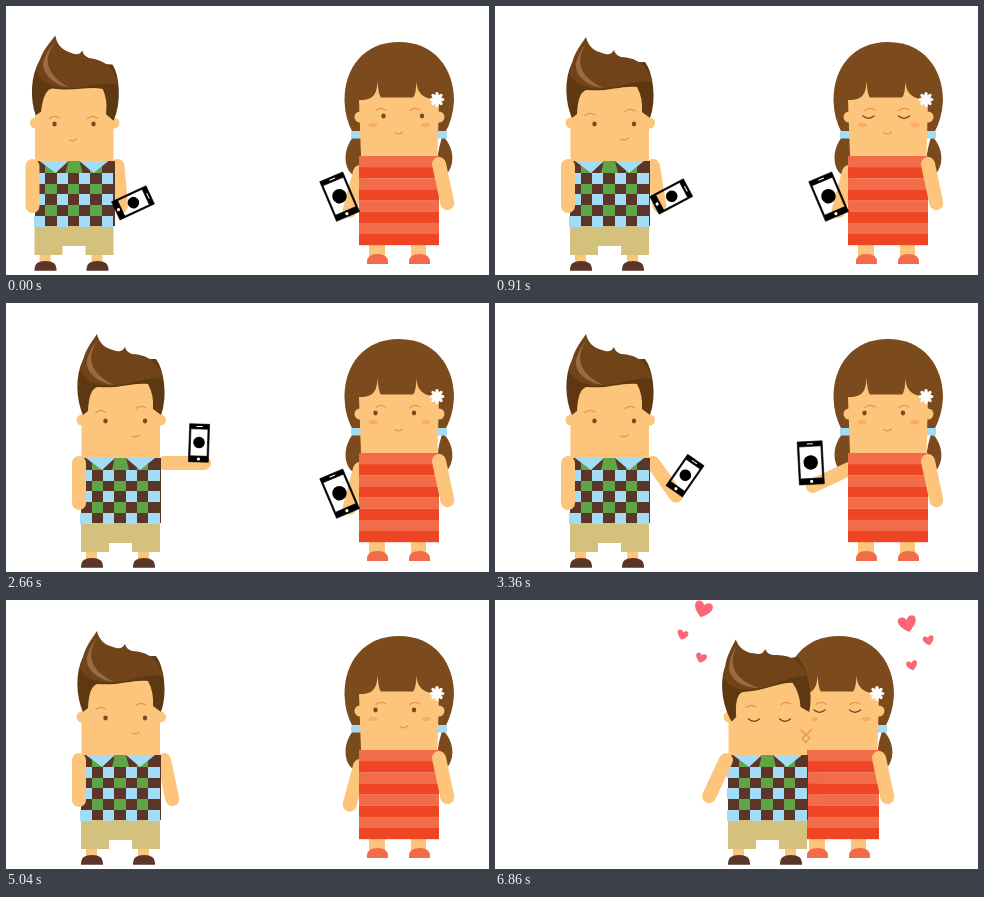
Animation of 483x269 px, one loop 7 s. Source, as an HTML page:

```html
<!DOCTYPE html>
<html lang="en">
<head>
<meta charset="utf-8">
<title>Two friends</title>
<style>
html, body { margin: 0; width: 100%; height: 100%; overflow: hidden; background: #fff; }
svg { display: block; width: 483px; height: 269px; }
.skin { fill: #fdc57b; }
.line { fill: none; stroke-linecap: round; stroke-width: 1.3; }
.brow { stroke: #e8974a; }
.lash { stroke: #71431f; }
.eye { fill: #7a4a20; }
.hairSide { fill: #5e3810; }
.hairTop { fill: #704318; }
.girlHair { fill: #7b4b1d; }
.shoe { fill: #5b3528; }
.sandal { fill: #f26c4a; }
.blue { fill: #a3dcf5; }
.green { fill: #5fa548; }
.heart { fill: #fd6674; }
</style>
</head>
<body>
<svg viewBox="0 0 483 269" id="stage"></svg>
<script>
const LOOP = 7000, STEP = 70;
const stage = document.getElementById('stage');
const $ = id => document.getElementById(id);

const rect = (x, y, w, h, extra = '') => `<rect x="${x}" y="${y}" width="${w}" height="${h}" ${extra}/>`;
const arm = id => `<g id="${id}">${rect(-7, -7, 14, 54, 'rx="7" class="skin"')}</g>`;
const line = (d, cls) => `<path class="line ${cls}" d="${d}"/>`;
const eye = (x, y) => `<ellipse class="eye" cx="${x}" cy="${y}" rx="2.2" ry="2.4"/>`;
const lash = (x, y) => line(`M${x - 5.5} ${y - 1}q5.5 4.6 11 0`, 'lash');
const brow = (x, y) => line(`M${x - 5} ${y + 1.5}q4.5 -4 10 -.5`, 'brow');
const ear = (x, y) => `<circle class="skin" cx="${x}" cy="${y}" r="5.5"/>`;
const shoe = (x, y, w, h, cls) =>
  `<path class="${cls}" d="M${x} ${y + h}v-2q0 ${2 - h} ${w / 2} ${2 - h}t${w / 2} ${h - 2}v2z"/>`;

// The frame is hollow, so the hand shows through the screen.
const phone = (id, w, h) => `<g id="${id}">
  <path fill-rule="evenodd" d="M${-w / 2} ${-h / 2}h${w}v${h}h${-w}zM${1.5 - w / 2} ${5 - h / 2}v${h - 11}h${w - 3}v${11 - h}z"
    stroke="#000" stroke-linejoin="round" stroke-width=".6"/>
  ${rect(-3, -h / 2 + 2, 6, 1, 'fill="#fff"')}
  <circle cy="${h / 2 - 3}" r="1.6" fill="#fff"/>
  <circle cy="-.5" r="${w * .29}"/></g>`;

function shirt() {
  const cell = 11.3, rowH = 10.75;
  let out = rect(75, 155, 80, 65, 'class="shoe"');
  for (let r = 0; r < 6; r++)
    for (let c = 0; c < 7; c++)
      if ((r + c) % 2) out += rect((74.4 + c * cell).toFixed(1), (156 + r * rowH).toFixed(1),
        cell, rowH, `class="${r % 2 ? 'blue' : 'green'}"`);
  return `<g shape-rendering="crispEdges">${out}</g>` +
    '<path class="blue" d="M80 155h29l-13 12zM120 155h29l-15 12z"/>' +
    '<path class="green" d="M109 155h11l3 12h-17z"/>';
}

const boyHair = `<g id="boyHair">
  <path class="hairSide" d="M77 112C70 96 69 73 77 57L150 56Q156 64 158 80Q160 98 155 112L147 106
    Q148 92 142 81C128 79 112 86 92 84Q83 85 82 108z"/>
  <path class="hairTop" d="M74 68Q75 62 77 57C80 46 85 40 91 31C93 40 99 45 107 47
    C113 49 116 49 119 44Q120 49 126 51C145 52 154 62 157 76C141 72 122 85 96 82Q80 80 74 68z"/>
  <path fill="#9a6a42" d="M92 37C80 53 83 70 108 82C92 80 79 69 81 57Q84 45 92 37z"/>
</g>`;

const farArm = `<g id="boyBack">${arm('boyRight')}</g>`;

const boy = `<g id="boy">
  <g id="footL">${rect(80, 246, 11, 11, 'class="skin"')}${shoe(75, 255, 22, 9.7, 'shoe')}</g>
  <g id="footR">${rect(132, 246, 11, 11, 'class="skin"')}${shoe(127, 255, 22, 9.7, 'shoe')}</g>
  <path fill="#d5c17e" d="M75 219h79v30h-28v-9h-23v9h-28z"/>
  ${shirt()}
  ${arm('boyLeft')}
  ${ear(76, 117)}${ear(154.5, 117)}
  <path class="skin" d="M80 78H150L154 108V155H75.500V108z"/>
  ${boyHair}
  <g id="boyFront">${eye(95, 118)}${eye(134, 118)}${brow(95, 111)}${brow(133, 111)}${line('M110 134q4 2 7 -1', 'brow')}</g>
  <g id="boySide">${eye(99.5, 118)}${eye(139, 118)}${brow(95, 108)}${brow(135, 104)}${line('M126 133q4 2 7 -1', 'brow')}</g>
  <g id="boyKiss">${lash(101, 120)}${lash(132, 120)}${brow(98, 106)}${brow(133, 103)}</g>
  ${phone('boyPhone', 20, 38)}
</g>`;

const stripes = Array.from({ length: 8 }, (_, i) =>
  rect(353, (150 + i * 11.13).toFixed(1), 80, 11.3, `fill="${i % 2 ? '#ee4524' : '#f36c4a'}"`)).join('');
const petals = Array.from({ length: 8 }, (_, i) =>
  `<ellipse cx="431" cy="89.5" rx="1.8" ry="3.4" transform="rotate(${i * 45} 431 93.5)"/>`).join('');

const girl = `<g id="girl">
  <path class="girlHair" d="M347 131C339 141 337 155 343 165Q348 172 357 172V131zM438 131C447 141 449 155 443 165Q438 172 430 172Q430 150 436 131z"/>
  <path class="girlHair" d="M393 36C428 36 448 62 448 95Q447 113 439 127H347Q339 113 338.500 95C338 62 358 36 393 36z"/>
  ${rect(345, 125, 12, 7.5, 'class="blue" rx="1"')}${rect(430, 125, 11, 7.5, 'class="blue" rx="1"')}
  ${arm('girlLeft')}
  <g id="girlFeet">
    ${rect(363, 236, 16, 16, 'class="skin"')}${rect(405, 236, 15, 16, 'class="skin"')}
    ${shoe(361, 248, 21, 10, 'sandal')}${shoe(403, 248, 21, 10, 'sandal')}
  </g>
  ${ear(354, 111)}${ear(433, 111)}
  <path class="skin" d="M353 94C364 94 371 92 371.500 75Q372.500 89 375 91.500H407Q410 89 410.500 75C411 90 420 93 433 94L431.500 150H355z"/>
  ${stripes}
  ${arm('girlRight')}
  <g fill="#fff">${petals}<circle cx="431" cy="93.5" r="4"/></g>
  <ellipse cx="367" cy="119" rx="4.5" ry="2.2" fill="#fbab62"/><ellipse cx="420" cy="119" rx="4.5" ry="2.2" fill="#fbab62"/>
  ${brow(375, 103)}${brow(409, 103)}
  <g id="girlOpen">${eye(369.5, 110)}${eye(408, 110)}</g>
  <g id="girlShut">${lash(373.5, 111)}${lash(409, 111)}</g>
  <g id="girlMouth">${line('M389 126.5q4 3 7.5 -.5', 'brow')}</g>
  ${phone('girlPhone', 25, 43)}
</g>`;

// x, y, size, tilt, time of appearance
const hearts = [
  [206, 58, 11, 16, 6230], [417, 65.5, 11, -12, 6230],
  [187.5, 35, 11, 16, 6510], [433.5, 40.5, 11, -12, 6510],
  [208, 9.5, 18, 16, 6860], [412.5, 24, 18, -12, 6860]
];
const heart = ([x, y, size, tilt], i) => `<path id="heart${i}" class="heart"
  transform="translate(${x} ${y}) rotate(${tilt}) scale(${size / 20})"
  d="M0 9C-7 4 -10 0 -10 -4C-10 -10 -2 -10 0 -4.5C2 -10 10 -10 10 -4C10 0 7 4 0 9z"/>`;

stage.innerHTML = farArm + girl + boy +
  `<g id="kiss">${line('M306 130l5 5l-4 3l4 5M317 129l-6 6l4 3l-4 4', 'brow')}</g>` +
  hearts.map(heart).join('');

// Linear interpolation through rows of [key, value, value, ...]
function along(rows, key) {
  let i = 1;
  while (i < rows.length - 1 && key > rows[i][0]) i++;
  const a = rows[i - 1], b = rows[i];
  const u = Math.min(1, Math.max(0, (key - a[0]) / (b[0] - a[0])));
  return a.slice(1).map((v, j) => v + (b[j + 1] - v) * u);
}

const boyX = [[0, -46.5], [770, 0], [5040, 0], [5600, 158]];
const girlX = [[5390, 0], [5600, -23], [5740, -49]];
const boyRightAngle = [[0, -5], [840, -5], [910, -9], [1540, -90], [2800, -90], [3640, -8], [4690, -8], [5040, -12], [5600, -6]];
const boyLeftAngle = [[5040, 0], [5600, 25]];
const girlLeftAngle = [[0, 15], [2800, 15], [3360, 65], [4270, 65], [4690, 15], [5320, 15], [5600, 10]];
const girlRightAngle = [[0, -12], [910, -12], [1260, -100], [1610, -100], [1890, -12]];
// time -> tilt and drop
const hairPose = [[0, 4, 0], [770, 0, 0], [5040, 0, 0], [5600, -7, 5]];
// arm angle -> phone offset from the hand and its tilt
const boyGrip = [[-90, -5, -20, 2], [-35, 9, -20, 35], [-9, 12, -9, 62], [-5, 12, -3, 65]];
const girlGrip = [[15, -10, -14, -23], [65, -2, -23, -3]];

const move = (id, x, y, angle = 0) => $(id).setAttribute('transform', `translate(${x} ${y}) rotate(${angle})`);
const show = (id, on) => $(id).setAttribute('display', on ? 'inline' : 'none');

function setPhone(id, x, y, angle, grip) {
  const rad = angle * Math.PI / 180;
  const [dx, dy, tilt] = along(grip, angle);
  move(id, x - 40 * Math.sin(rad) + dx, y + 40 * Math.cos(rad) + dy, tilt);
}

function walk(t, from, to, height) {
  const phase = (t - from) / (to - from);
  if (phase <= 0 || phase >= 1) return [0, 0];
  return [-height * Math.abs(Math.sin(phase * Math.PI * 2)), Math.sin(phase * Math.PI * 4)];
}

function draw(t) {
  const bx = along(boyX, t)[0];
  const [hop, stride] = t < 770 ? walk(t, 0, 770, 6) : walk(t, 5040, 5600, 8);
  move('boy', bx, hop);
  move('boyBack', bx, hop);
  move('footL', stride * 4, Math.max(0, stride) * 3);
  move('footR', -stride * 4, Math.max(0, -stride) * 3);

  const girlStep = Math.sin(Math.PI * Math.min(1, Math.max(0, (t - 5390) / 350)));
  move('girl', along(girlX, t)[0], 0);
  move('girlFeet', girlStep * 12, girlStep * -2);

  const [tilt, drop] = along(hairPose, t);
  $('boyHair').setAttribute('transform', `translate(0 ${drop}) rotate(${tilt} 115 100)`);

  const boyAngle = along(boyRightAngle, t)[0], girlAngle = along(girlLeftAngle, t)[0];
  move('boyRight', 158, 160, boyAngle);
  move('boyLeft', 73, 160, along(boyLeftAngle, t)[0]);
  move('girlLeft', 354, 166, girlAngle);
  move('girlRight', 433, 158, along(girlRightAngle, t)[0]);
  setPhone('boyPhone', 158, 160, boyAngle, boyGrip);
  setPhone('girlPhone', 354, 166, girlAngle, girlGrip);
  show('boyPhone', t < 4690);
  show('girlPhone', t < 4690);

  const kissing = t >= 5740;
  const shut = kissing || (t >= 840 && t < 1050);
  show('boyFront', t < 840);
  show('boySide', t >= 840 && !kissing);
  show('boyKiss', kissing);
  show('girlOpen', !shut);
  show('girlShut', shut);
  show('girlMouth', !kissing);
  show('kiss', kissing);
  move('girlOpen', t < 840 ? 8 : 0, 0);
  move('girlMouth', t >= 5390 ? -11 : t >= 4690 ? 5 : 0, 0);
  hearts.forEach((h, i) => show('heart' + i, t >= h[4]));
}

const start = performance.now();
function tick(now) {
  const t = Math.max(0, now - start) % LOOP;
  draw(Math.floor(t / STEP) * STEP);
  requestAnimationFrame(tick);
}
draw(0);
requestAnimationFrame(tick);
</script>
</body>
</html>
```
